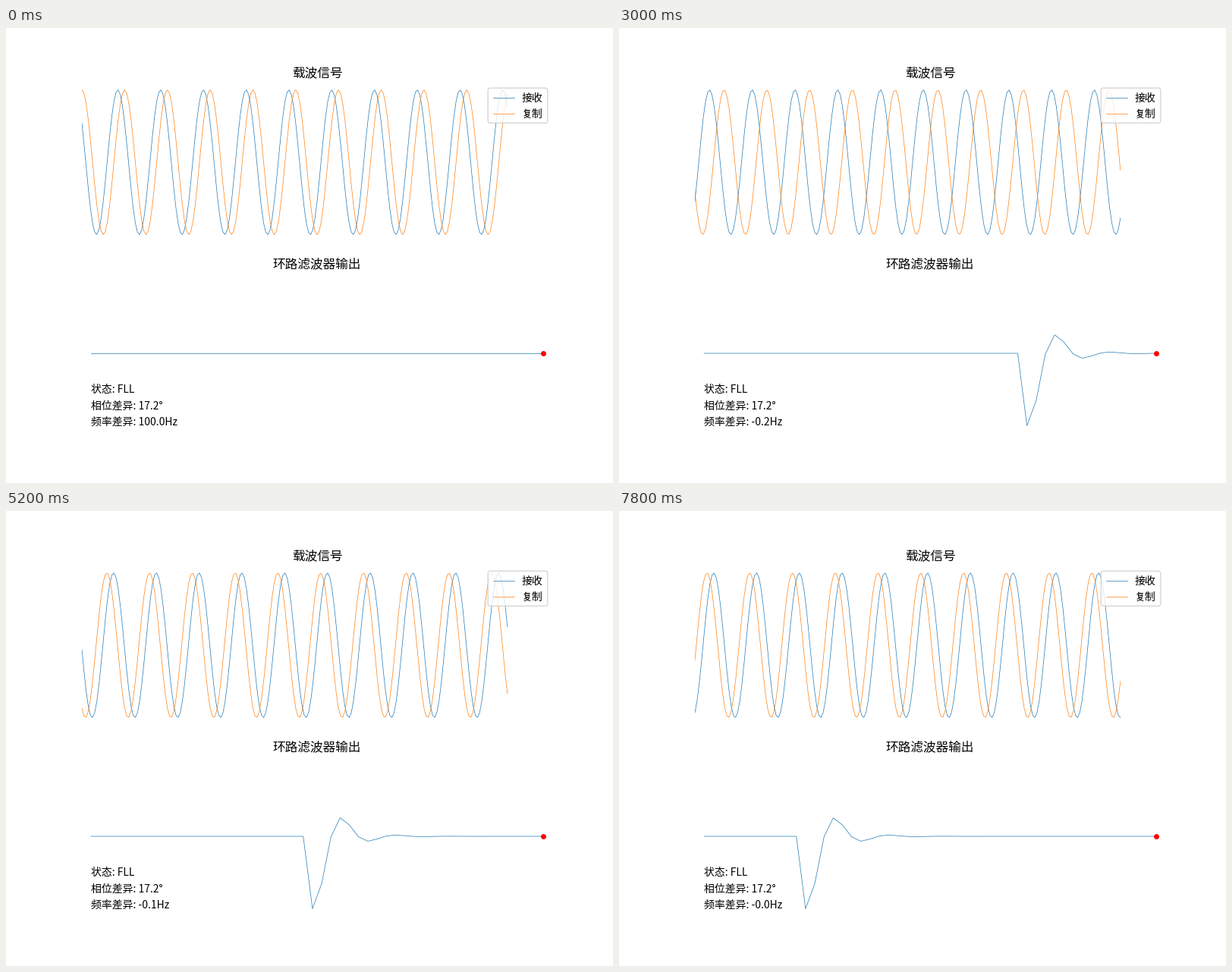
Recreate the animation shown at these times as a matplotlib script. Size 800 by 600 pixels, loop 8 s.

```python
import math

import matplotlib.pyplot as plt
import numpy as np
from matplotlib.animation import FuncAnimation
from matplotlib.lines import Line2D
from matplotlib.patches import FancyBboxPatch

W, H, DPI = 800, 600, 100
FRAMES, STEP_MS = 40, 200
HISTORY = 50        # filter outputs kept on screen
DOPPLER = 0.1       # received carrier advance, cycles per frame
GAIN = 0.8          # loop gain
BIT_FRAMES = 20     # the data bit inverts the carrier after this many frames
BLUE, ORANGE = "tab:blue", "tab:orange"

plt.rcParams["font.family"] = "Noto Sans CJK JP"


def run_loop():
    """Frequency error, filter output and replica phase (cycles) per frame."""
    err, out, phase = [DOPPLER, DOPPLER], [0.0], [0.0]
    for n in range(1, FRAMES):
        mean = (err[n] + err[n - 1]) / 2
        out.append(-GAIN * math.sin(math.tau * mean) / math.tau)
        err.append(err[n] + out[n])
        phase.append(phase[n - 1] + DOPPLER - err[n - 1])
    return np.array(err[:FRAMES]), np.array(out), np.array(phase)


err, out, replica_phase = run_loop()
out = out / np.abs(out).max()
trace = np.concatenate([np.zeros(HISTORY - 1), out])


def freq_text(n):
    hz = 1000 * err[n]
    if n > 1:
        hz += 0.04 * math.cos(math.tau * (n - 4) / 5) - 0.07  # sampling ripple
    return f"频率差异: {hz:.1f}Hz"


def label(x, y, text, size=10, **kw):
    return fig.text(x / W, 1 - y / H, text, fontsize=size, color="black",
                    va="baseline", zorder=6, **kw)


fig, (top, bottom) = plt.subplots(2, 1, figsize=(W / DPI, H / DPI), dpi=DPI)
fig.subplots_adjust(left=0.125, right=0.9, bottom=0.11, top=0.88, hspace=0.2)
for ax, right in ((top, 1.1), (bottom, HISTORY + 1)):
    ax.set_xlim(0, right)
    ax.set_ylim(-1.1, 1.1)
    ax.axis("off")

t = np.arange(200) / 200
received, = top.plot([], [], color=BLUE, lw=0.5)
replica, = top.plot([], [], color=ORANGE, lw=0.5)
slots = np.arange(1, HISTORY + 1)
curve, = bottom.plot([], [], color=BLUE, lw=0.5)
dot, = bottom.plot([], [], "ro", ms=4)

label(410, 64.5, "载波信号", 12, ha="center")
label(410, 316.5, "环路滤波器输出", 12, ha="center")
label(112, 481.5, "状态: FLL")
label(112, 502.5, "相位差异: 17.2°")
freq = label(112, 523.5, "")

# Legend
fig.add_artist(FancyBboxPatch(
    (638 / W, 1 - 122.5 / H), 73 / W, 40.5 / H, transform=fig.transFigure,
    boxstyle=f"round,pad={2.8 / W},rounding_size={2.8 / W}",
    mutation_aspect=W / H, fc="white", ec="0.8", lw=1, alpha=0.8, zorder=4))
for y, color, name in ((92, BLUE, "接收"), (113, ORANGE, "复制")):
    fig.add_artist(Line2D([641.5 / W, 669.5 / W], [1 - y / H] * 2,
                          color=color, lw=0.5, zorder=5))
    label(680, y + 5, name)


def draw(n):
    flip = math.pi * (n // BIT_FRAMES)
    cycles = math.tau * 10 * t
    received.set_data(t, np.cos(cycles + 1 + math.tau * DOPPLER * n + flip))
    replica.set_data(t, np.cos(cycles + math.tau * replica_phase[n]))
    curve.set_data(slots, trace[n:n + HISTORY])
    dot.set_data([HISTORY], [out[n]])
    freq.set_text(freq_text(n))
    return received, replica, curve, dot, freq


anim = FuncAnimation(fig, draw, frames=FRAMES, interval=STEP_MS,
                     repeat=True, repeat_delay=0)
plt.show()
```
